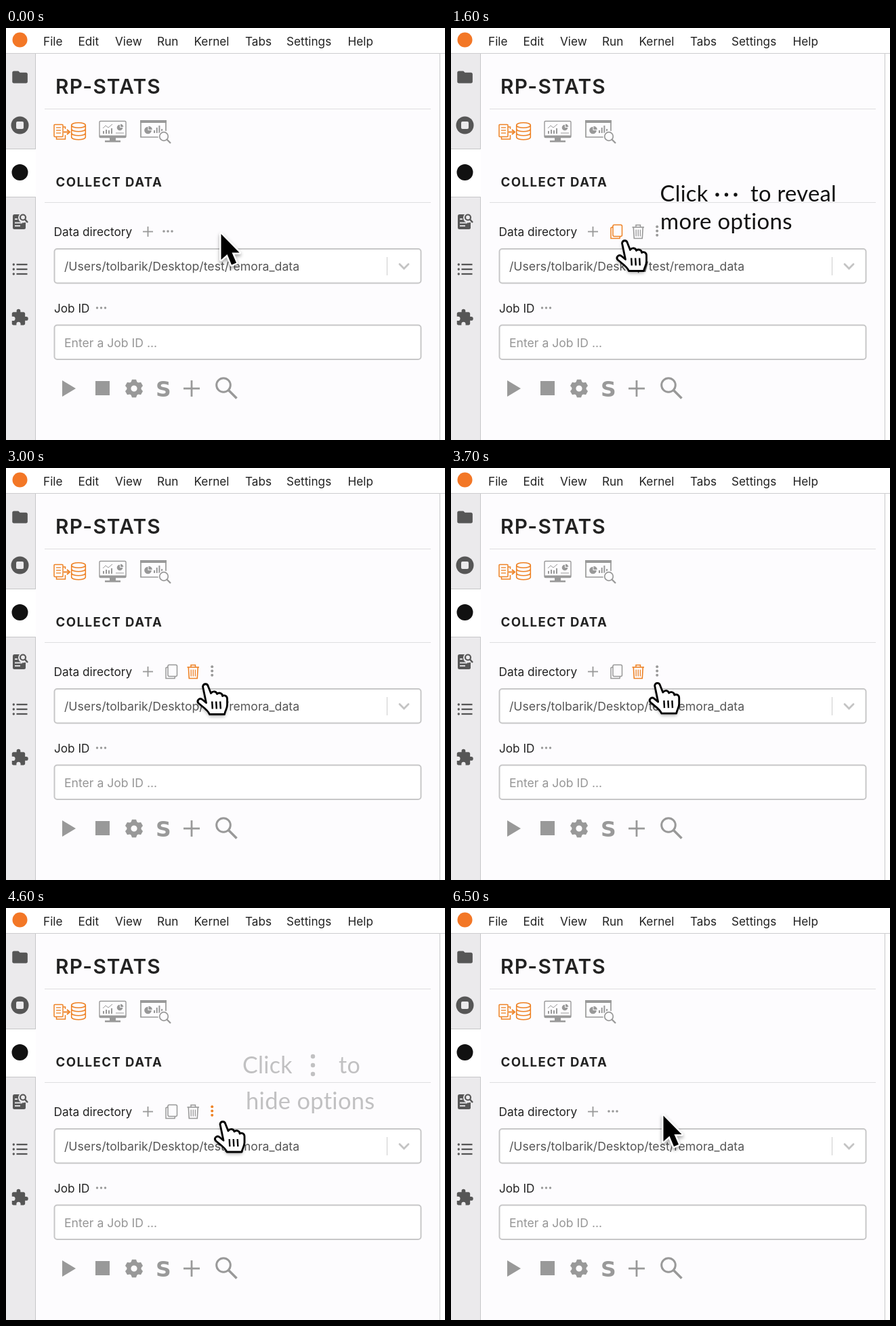
Recreate the animation shown at these times as an HTML page with a canvas. Size 648 px wide and 608 px high, loop 6.6 s.

```html
<!DOCTYPE html>
<html lang="en">
<head>
<meta charset="utf-8">
<title>Collect data</title>
<style>
html, body { margin: 0; width: 648px; height: 608px; overflow: hidden; background: #fdfcfe; }
canvas { display: block; }
</style>
</head>
<body>
<canvas id="stage" width="648" height="608"></canvas>
<script>
const ctx = document.getElementById('stage').getContext('2d');
const LOOP = 6600, STEP = 100;
const GREY = '#999', DARK = '#565656', ORANGE = '#ee8225', INK = '#222', SIDE = '#ebeaec', PAGE = '#fdfcfe';
const UI = 'Inter, "Open Sans", sans-serif', NOTE = 'Lato, Carlito, sans-serif';
const HEAVY = '"DejaVu Sans", sans-serif';

const FOLDER = new Path2D('M10 4H4c-1.1 0-2 .9-2 2v12c0 1.1.9 2 2 2h16c1.1 0 2-.9 2-2V8c0-1.1-.9-2-2-2h-8z');
const PUZZLE = new Path2D('M20.5 11H19V7c0-1.1-.9-2-2-2h-4V3.5a2.5 2.5 0 0 0-5 0V5H4c-1.1 0-2 .9-2 2v3.8h1.5a2.7 2.7 0 0 1 0 5.4H2V20c0 1.1.9 2 2 2h3.8v-1.5a2.7 2.7 0 0 1 5.4 0V22H17c1.1 0 2-.9 2-2v-4h1.5a2.5 2.5 0 0 0 0-5z');
const ARROW = new Path2D('M0 0V38L9 30L15.5 45.5L22.5 42.5L16 27.5H27Z');
const HAND = new Path2D('M-4 3C-3-2 3-2 4 3L8 13C11 9 16 10 17 14C20 11 25 13 25 17C28 15 32 17 32 21V30C32 36 29 38 28 44H6C4 38-4 33-10 28C-14 24-9 19-5 22L1 27Z');

// Pointer hot spot: time, x, y
const TRACK = [
  [0, 317.5, 303], [700, 317.5, 303], [1000, 270.5, 299], [1300, 250, 304], [2100, 250, 304],
  [2400, 257, 306], [2800, 279, 308], [3000, 288, 309], [3500, 288, 309],
  [4000, 313.5, 305.5], [6600, 313.5, 305.5]
];
const OPEN = 1600, CLOSE = 5200, HAND_FROM = 1200;

const ramp = (t, a, b) => Math.min(1, Math.max(0, (t - a) / (b - a)));
const fade = (t, a, b, c, d) => ramp(t, a, b) * (1 - ramp(t, c, d));

function pointerAt(t) {
  const i = TRACK.findIndex(k => k[0] > t);
  const [t0, x0, y0] = TRACK[i - 1], [t1, x1, y1] = TRACK[i];
  const p = ramp(t, t0, t1);
  return [x0 + (x1 - x0) * p, y0 + (y1 - y0) * p];
}

function text(s, x, y, size, color, weight = 400, spacing = 0, family = UI) {
  ctx.font = `${weight} ${size}px ${family}`;
  ctx.letterSpacing = spacing + 'px';
  ctx.fillStyle = color;
  ctx.fillText(s, x, y);
}
function box(x, y, w, h, color) {
  ctx.fillStyle = color;
  ctx.fillRect(x, y, w, h);
}
function disc(x, y, r, color) {
  ctx.fillStyle = color;
  ctx.beginPath();
  ctx.arc(x, y, r, 0, 7);
  ctx.fill();
}
function ring(x, y, r, color, w) {
  ctx.strokeStyle = color;
  ctx.lineWidth = w;
  ctx.beginPath();
  ctx.arc(x, y, r, 0, 7);
  ctx.stroke();
}
function line(color, w, ...p) {
  ctx.strokeStyle = color;
  ctx.lineWidth = w;
  ctx.beginPath();
  for (let i = 0; i < p.length; i += 2) ctx.lineTo(p[i], p[i + 1]);
  ctx.stroke();
}
function frame(x, y, w, h, r, color, lw) {
  ctx.strokeStyle = color;
  ctx.lineWidth = lw;
  ctx.beginPath();
  ctx.roundRect(x, y, w, h, r);
  ctx.stroke();
}
function slab(x, y, w, h, r, color) {
  ctx.fillStyle = color;
  ctx.beginPath();
  ctx.roundRect(x, y, w, h, r);
  ctx.fill();
}
function shape(path, x, y, scale, color) {
  ctx.save();
  ctx.translate(x, y);
  ctx.scale(scale, scale);
  ctx.fillStyle = color;
  ctx.fill(path);
  ctx.restore();
}
function plus(x, y, r, w) {
  line(GREY, w, x - r, y, x + r, y);
  line(GREY, w, x, y - r, x, y + r);
}
function dots(x, y, dx, dy, r, color) {
  for (let i = -1; i <= 1; i++) disc(x + i * dx, y + i * dy, r, color);
}
function pie(x, y, r) {
  ctx.fillStyle = GREY;
  ctx.beginPath();
  ctx.moveTo(x, y);
  ctx.arc(x, y, r, 0, Math.PI * 1.5);
  ctx.fill();
  ctx.beginPath();
  ctx.moveTo(x + 1, y - 1);
  ctx.arc(x + 1, y - 1, r, -Math.PI / 2, 0);
  ctx.fill();
}

function sidebar() {
  box(0, 38, 43, 570, SIDE);
  box(43, 38, 1, 570, '#c6c6c8');
  box(0, 179, 44, 71, '#fff');
  box(0, 178, 44, 1, '#c6c6c8');
  box(0, 249, 44, 1, '#c6c6c8');
  shape(FOLDER, 7, 59, 1.13, DARK);
  disc(20.5, 143.5, 13, DARK);
  slab(15, 138, 11, 11, 2, SIDE);
  disc(20.5, 213, 12, '#111');

  slab(10, 275, 19, 22, 2.5, DARK);
  disc(25.5, 280, 7.5, SIDE);
  ring(25, 279.5, 4, DARK, 2.2);
  line(DARK, 2.5, 28, 282.5, 32, 287);
  line(SIDE, 1.8, 13, 282, 17, 282);
  line(SIDE, 1.8, 13, 287.5, 24, 287.5);
  line(SIDE, 1.8, 13, 292, 21, 292);

  for (const y of [349, 356, 363]) {
    disc(11.3, y, 1.7, DARK);
    line(DARK, 2.3, 15.5, y, 31.5, y);
  }
  shape(PUZZLE, 6.5, 413.5, 1.14, DARK);
}

function tabs() {
  // documents into database
  frame(71, 142.5, 13, 18, 1, ORANGE, 1.5);
  line(ORANGE, 1.5, 84, 146, 87.5, 146, 87.5, 164, 74.5, 164, 74.5, 161);
  for (const y of [147, 151, 155]) line(ORANGE, 1.3, 74, y, 81, y);
  box(86, 149, 3, 9, PAGE);
  line(ORANGE, 2, 85, 153.5, 92, 153.5);
  line(ORANGE, 2, 90, 150, 94, 153.5, 90, 157);
  ctx.strokeStyle = ORANGE;
  ctx.lineWidth = 1.6;
  ctx.beginPath();
  ctx.ellipse(107, 143.5, 10.3, 3.8, 0, 0, 7);
  for (const y of [149, 155, 161]) {
    ctx.moveTo(117.3, y);
    ctx.ellipse(107, y, 10.3, 3.8, 0, 0, Math.PI);
  }
  ctx.moveTo(96.7, 143.5);
  ctx.lineTo(96.7, 161);
  ctx.moveTo(117.3, 143.5);
  ctx.lineTo(117.3, 161);
  ctx.stroke();

  // monitor
  frame(138, 137.5, 39, 24, 1.5, GREY, 1.4);
  box(138, 158.5, 39, 3, GREY);
  box(153, 162, 9, 4, GREY);
  box(146, 166, 23, 2.5, GREY);
  [4, 6, 5, 8].forEach((h, i) => box(143 + i * 4, 156 - h, 2, h, GREY));
  line(GREY, 1, 143, 148, 147, 144, 151, 147, 157, 142);
  pie(168, 147, 4.3);
  line(GREY, 1, 162, 155, 174, 155);

  // report search
  line(GREY, 1.7, 226, 161, 199, 161, 199, 137, 236, 137, 236, 152);
  box(198, 136, 39, 4, GREY);
  pie(209.5, 151, 5.3);
  [4, 8, 11, 6].forEach((h, i) => box(218 + i * 3.7, 155 - h, 2, h, GREY));
  disc(233, 160, 8.5, PAGE);
  ring(233, 160, 6.3, GREY, 1.7);
  line(GREY, 2.3, 237.5, 164.5, 243, 170);
}

function gear(x, y) {
  ctx.save();
  ctx.translate(x, y);
  for (let i = 0; i < 6; i++) {
    ctx.rotate(Math.PI / 3);
    ctx.fillStyle = GREY;
    ctx.beginPath();
    ctx.moveTo(-5, -8);
    ctx.lineTo(-3, -13.3);
    ctx.lineTo(3, -13.3);
    ctx.lineTo(5, -8);
    ctx.fill();
  }
  ctx.restore();
  ring(x, y, 7.6, GREY, 6);
}

function form() {
  text('Data directory', 70.5, 307, 17.3, INK);
  plus(209.5, 300.5, 7.5, 1.8);
  for (const y of [326, 438.5]) {
    slab(71.5, y, 541, 50.5, 4, '#fff');
    frame(71.5, y, 541, 50.5, 4, '#c7c7c8', 2);
  }
  text('/Users/tolbarik/Desktop/test/remora_data', 86, 358, 17.7, '#565656');
  box(562, 338, 1, 27, '#ccc');
  ctx.lineCap = 'round';
  line('#c4c4c4', 2.8, 581, 348.5, 587.5, 355, 594, 348.5);
  ctx.lineCap = 'butt';

  text('Job ID', 71, 420, 17.2, INK);
  dots(140.5, 413, 6, 0, 1.7, GREY);
  text('Enter a Job ID ...', 86, 471, 17.6, '#969696');

  ctx.fillStyle = GREY;
  ctx.beginPath();
  ctx.moveTo(83, 520);
  ctx.lineTo(103, 532);
  ctx.lineTo(83, 544);
  ctx.fill();
  box(132, 521, 21, 21, GREY);
  gear(189, 532);
  text('S', 221, 543.5, 31.5, GREY, 700, 0, HEAVY);
  plus(274, 532, 12, 2.8);
  ring(321, 527, 10.3, GREY, 3);
  line(GREY, 3.6, 328, 534, 340.5, 546.5);
}

function options(open, hover) {
  const tint = name => hover === name ? ORANGE : GREY;
  if (!open) {
    dots(239, 300, 6, 0, 1.8, tint('more'));
    return;
  }
  const c = tint('copy'), b = tint('trash');
  frame(239, 290.5, 13.5, 17, 2, c, 1.5);
  line(c, 1.5, 239, 293.5, 236, 295, 236, 310.5, 249, 310.5, 249.5, 308);

  line(b, 1.6, 267.5, 294, 285, 294);
  line(b, 1.5, 273, 294, 273, 290.8, 279.5, 290.8, 279.5, 294);
  line(b, 1.6, 269.3, 294, 270.3, 310.5, 282.3, 310.5, 283.3, 294);
  for (const x of [273.2, 276.3, 279.4]) line(b, 1.3, x, 297.5, x, 307.5);
  dots(304.2, 299.5, 0, 6.3, 2, tint('less'));
}

function notes(t) {
  const say = (s, x, y, size) => text(s, x, y, size, '#111', 400, 0.3, NOTE);
  ctx.globalAlpha = fade(t, 200, 600, 1600, 2000);
  say('Click', 308.5, 256, 32.7);
  dots(406.5, 246, 13.5, 0, 2.7, '#111');
  say('to reveal', 442, 256, 32.7);
  say('more options', 309, 297, 33);
  ctx.globalAlpha = fade(t, 4500, 4900, 5500, 5900);
  say('Click', 349, 244, 34);
  dots(453, 232, 0, 13, 3.2, '#111');
  say('to', 491, 244, 34);
  say('hide options', 354, 296.5, 34.5);
  ctx.globalAlpha = 1;
}

function pointer(x, y, isHand) {
  ctx.save();
  ctx.lineJoin = 'round';
  ctx.shadowColor = 'rgba(0,0,0,.35)';
  ctx.shadowBlur = 5;
  ctx.shadowOffsetY = 3;
  if (isHand) {
    ctx.translate(x + 6.5, y + 10.5);
    ctx.fillStyle = '#fff';
    ctx.fill(HAND);
    ctx.shadowColor = 'transparent';
    ctx.strokeStyle = '#000';
    ctx.lineWidth = 2.8;
    ctx.stroke(HAND);
    for (const lx of [10, 16, 22]) line('#000', 2.4, lx - 0.3, 25, lx + 0.3, 36);
  } else {
    ctx.translate(x, y + 1);
    ctx.strokeStyle = '#fff';
    ctx.lineWidth = 5;
    ctx.stroke(ARROW);
    ctx.shadowColor = 'transparent';
    ctx.fillStyle = '#000';
    ctx.fill(ARROW);
  }
  ctx.restore();
}

function draw(t) {
  box(0, 0, 648, 608, PAGE);
  box(641, 38, 7, 570, '#fff');
  box(640, 38, 1, 570, '#c8c8ca');
  box(0, 0, 648, 37, '#fff');
  box(0, 37, 648, 1, '#cdcdcf');
  disc(20.5, 17.5, 11, '#f37726');
  const menu = { File: 55, Edit: 106.5, View: 161, Run: 223, Kernel: 277.5, Tabs: 353, Settings: 414, Help: 504.5 };
  for (const name in menu) text(name, menu[name], 25.5, 17.2, INK);
  sidebar();
  text('RP-STATS', 73, 97, 29.8, INK, 600, 1.25);
  box(57, 119, 570, 1, '#dedee0');
  tabs();
  text('COLLECT DATA', 73.5, 234, 18.6, INK, 700, 1.45);
  box(57, 257, 570, 1, '#dedee0');
  form();

  const [x, y] = pointerAt(t);
  const open = t >= OPEN && t < CLOSE;
  const isHand = t >= HAND_FROM && t < CLOSE;
  const hover = !isHand ? '' : !open ? 'more' : x < 268 ? 'copy' : x < 300 ? 'trash' : 'less';
  options(open, hover);
  notes(t);
  pointer(x, y, isHand);
}

const start = performance.now();
function tick() {
  const t = (performance.now() - start) % LOOP;
  draw(Math.floor(t / STEP) * STEP);
  requestAnimationFrame(tick);
}
tick();
</script>
</body>
</html>
```
